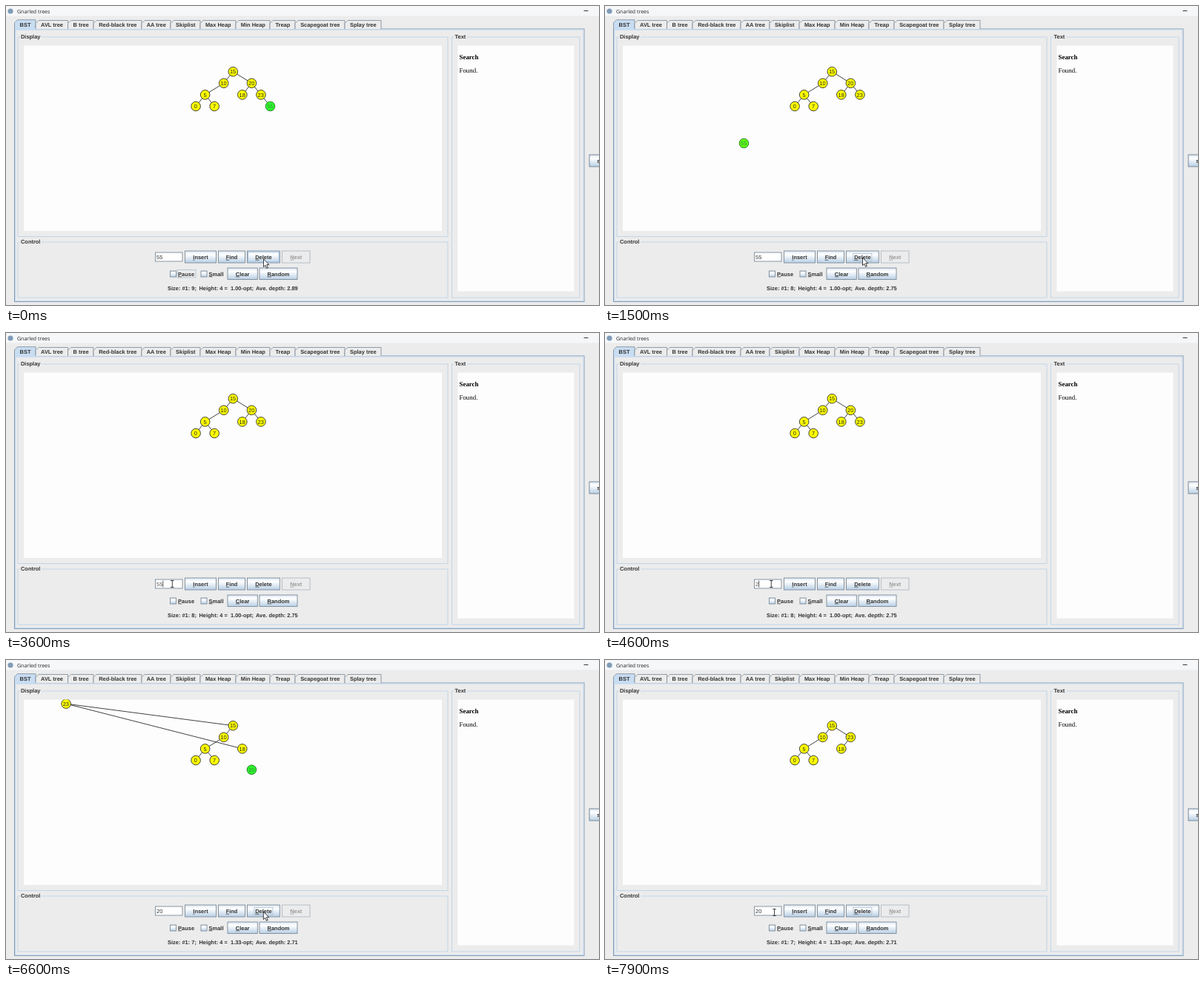
These frames come from a looping animation (800x404 px, 8000 ms). An HTML page:

```html
<!DOCTYPE html>
<html lang="en">
<head>
<meta charset="utf-8">
<title>Gnarled trees</title>
<style>
  html, body { margin: 0; width: 100%; height: 100%; overflow: hidden; background: #ececec; }
  svg { display: block; width: 100%; height: 100%; }
  text { font: 7.45px "Liberation Sans", Arial, sans-serif; fill: #333; white-space: pre; text-rendering: geometricPrecision; }
  .serif { font: 8.9px "Liberation Serif", Times, serif; fill: #000; }
  .title { font: 7px "Open Sans", "Noto Sans", sans-serif; fill: #222; }
  .bold { font-weight: bold; }
  .mid { text-anchor: middle; }
  .u { text-decoration: underline; }
</style>
</head>
<body>
<svg id="stage" viewBox="0 0 800 404" preserveAspectRatio="none">
  <defs>
    <linearGradient id="metal" x1="0" y1="0" x2="0" y2="1">
      <stop offset="0" stop-color="#dde8f3"/>
      <stop offset=".3" stop-color="#fff"/>
      <stop offset="1" stop-color="#b8cfe5"/>
    </linearGradient>
    <clipPath id="canvasClip"><rect x="24" y="53.5" width="564" height="250.5"/></clipPath>
  </defs>
  <g id="frame"></g>
  <g id="tree" clip-path="url(#canvasClip)"></g>
  <g id="control"></g>
  <g id="pointer"></g>
</svg>
<script>
const LOOP = 8000, STEP = 100;
const DELETE_55 = 1200, DELETE_20 = 6400, FALL = 1000, FIELD_CLICK = 3400;
const layer = id => document.getElementById(id);

const attrs = o => Object.entries(o).map(([k, v]) => ` ${k}="${v}"`).join('');
const rect = (x, y, x2, y2, fill = 'none', stroke = 'none', extra = {}) =>
  `<rect${attrs({ x, y, width: x2 - x, height: y2 - y, fill, stroke, ...extra })}/>`;
const label = (x, y, s, cls = 'bold', extra = {}) => `<text${attrs({ x, y, class: cls, ...extra })}>${s}</text>`;
const path = (d, stroke, fill = 'none', width = 1) =>
  `<path${attrs({ d, stroke, fill, 'stroke-width': width })}/>`;
const mnemonic = s => `<tspan class="u">${s[0]}</tspan>${s.slice(1)}`;

const tabs = [['BST', 40], ['AVL tree', 83.5], ['B tree', 118], ['Red-black tree', 183], ['AA tree', 222],
  ['Skiplist', 262], ['Max Heap', 310], ['Min Heap', 356], ['Treap', 390], ['Scapegoat tree', 457], ['Splay tree', 506]];

function button(x, x2, y, y2, name, { disabled, hover, focus } = {}) {
  const mid = (x + x2) / 2, base = (y + y2) / 2 + 2.8;
  let s = rect(x, y, x2, y2, disabled ? '#ececec' : 'url(#metal)', disabled ? '#b0b8c0' : '#7a8a99', { 'stroke-width': .9 });
  if (hover) s += rect(x + 1, y + 1, x2 - 1, y2 - 1, 'none', '#a3bfdc', { 'stroke-width': 1.2 });
  if (focus) s += rect(mid - 12.5, base - 7.5, mid + 12.5, base + 2.5, 'none', '#a3b8cc', { 'stroke-width': .7 });
  return s + label(mid, base, mnemonic(name), 'bold mid', disabled ? { style: 'fill:#999' } : {});
}

function checkbox(x, name, focus) {
  return rect(x, 358, x + 8, 366, 'url(#metal)', '#7a8a99', { 'stroke-width': .9 }) +
    label(x + 10.6, 364.5, mnemonic(name)) +
    (focus ? rect(x + 9.5, 356.5, x + 34.5, 367, 'none', '#a3b8cc', { 'stroke-width': .7 }) : '');
}

function group(x, y, x2, y2, title, titleWidth) {
  return rect(x, y, x2, y2, 'none', '#b8cfe5', { 'stroke-width': .8 }) +
    rect(x + 3, y - 3, x + 5 + titleWidth, y + 3, '#ececec') + label(x + 4, y + 2.3, title);
}

function drawFrame() {
  let s = rect(0, 0, 800, 404, '#ececec') + rect(0, 0, 800, 13.5, '#f6f7f9') +
    '<circle cx="6" cy="7" r="3.6" fill="#7f9bb8"/>' + label(15, 9.8, 'Gnarled trees', 'title') +
    path('M779.5 6.5h6', '#222', 'none', .9);
  s += rect(11.5, 31, 780, 399.5, 'none', '#7f96ae') +
    rect(12.7, 32, 779, 398.5, 'none', '#c8ddf2', { 'stroke-width': 1.2 });
  let x = 11.5;
  tabs.forEach(([name, end], i) => {
    const top = i ? 19.5 : 18.7;
    s += path(`M${x} 31V${top + 4}L${x + 4} ${top}H${end}V31`, '#7a8a99', i ? '#ececec' : '#c8ddf2', .8);
    s += label((x + end) / 2 + .3, 27.5, name, 'bold mid');
    x = end;
  });
  s += rect(12, 30, 39.6, 32.5, '#c8ddf2');
  s += group(16, 42, 596, 311.5, 'Display', 27) + rect(24, 53.5, 588, 304, '#fdfdfd');
  s += group(16, 319, 596, 394, 'Control', 27);
  s += group(601.5, 42, 774, 394, 'Text', 16) + rect(609.5, 53.5, 766.5, 385.5, '#fdfdfd');
  s += label(611.5, 71.5, 'Search', 'serif bold') + label(611.5, 89.6, 'Found.', 'serif');
  s += rect(787, 201, 810, 217, 'url(#metal)', '#7a8a99') + label(797.3, 211.8, 's');
  layer('frame').innerHTML = s;
}

const slot = (column, depth) => [306.3 + column * 12.55, 88.7 + depth * 15.6];
const mix = (a, b, p) => a.map((v, i) => v + (b[i] - v) * p);

function drawTree(t) {
  const at = { 15: slot(0, 0), 10: slot(-1, 1), 20: slot(2, 1), 5: slot(-3, 2), 18: slot(1, 2),
    23: slot(3, 2), 0: slot(-4, 3), 7: slot(-2, 3), 55: slot(4, 3) };
  const edges = [[15, 10], [10, 5], [5, 0], [5, 7]];
  const gone = new Set(), green = {};
  const fall55 = (t - DELETE_55) / FALL, fall20 = (t - DELETE_20) / FALL;

  if (fall55 < 0) edges.push([23, 55]);
  else at[55] = mix(at[55], [-207, 302], fall55);
  green[55] = fall55 < 0 ? '#2bff2b' : '#5cff14';
  if (fall55 >= 1) gone.add('55');

  if (fall20 < 0) edges.push([15, 20], [20, 18], [20, 23]);
  else {
    edges.push([15, 23], [23, 18]);
    at[23] = mix([18.5, 47.8], at[20], Math.min(1, fall20));
    at[20] = mix(at[20], [331.4, 324], fall20);
    green[20] = '#2bf52b';
    if (fall20 >= 1) gone.add('20');
  }

  const node = key => {
    const [x, y] = at[key];
    const [fill, stroke, ink] = green[key] ? [green[key], '#1c6a1c', '#3f7f3f'] : ['#ff0', '#222', '#222'];
    return `<circle cx="${x}" cy="${y}" r="6.3" fill="${fill}" stroke="${stroke}" stroke-width=".85"/>` +
      label(x - .2, y + 2.7, key, 'mid', { style: `fill:${ink}` });
  };
  const keys = Object.keys(at).filter(k => !gone.has(k)).sort((a, b) => !!green[a] - !!green[b]);
  layer('tree').innerHTML =
    edges.map(([a, b]) => path(`M${at[a]}L${at[b]}`, '#222', 'none', .85)).join('') + keys.map(node).join('');
}

const typing = [[0, '55'], [4000, '5'], [4200, ''], [4400, '2'], [4700, '20']];

function drawControl(t) {
  const editing = t >= FIELD_CLICK && t < DELETE_20;
  const deleteFocus = t >= DELETE_55 && !editing;
  const [since, value] = typing.filter(k => k[0] <= t).pop();
  const caretOn = (t - Math.max(since, FIELD_CLICK)) % 1000 < 500;
  const [size, height, depth] = t < DELETE_55 ? [9, '1.00', '2.89'] : t < DELETE_20 ? [8, '1.00', '2.75'] : [7, '1.33', '2.71'];

  let s = rect(201.5, 333, 238, 345, '#fff', '#7a8a99', { 'stroke-width': .9 }) +
    label(203, 341.8, value, '', { style: `fill:${editing ? '#555' : '#333'}` });
  if (editing && caretOn) s += path(`M${203.5 + value.length * 4.17} 334.5v9`, '#333', 'none', .8);
  s += button(241.5, 283.5, 331, 347, 'Insert') + button(286.5, 322.5, 331, 347, 'Find') +
    button(325.5, 369.3, 331, 347, 'Delete', { hover: t < DELETE_55, focus: deleteFocus }) +
    button(372.5, 410, 331, 347, 'Next', { disabled: true });
  s += checkbox(221.5, 'Pause', t < DELETE_55) + checkbox(263, 'Small') +
    button(299, 339.3, 354, 369.5, 'Clear') + button(342, 393, 354, 369.5, 'Random');
  s += label(218, 383.8, `Size: #1: ${size};`) + label(260.5, 383.8, 'Height: 4 =') +
    label(303, 383.8, `${height}-opt;`) + label(337, 383.8, `Ave. depth: ${depth}`);
  layer('control').innerHTML = s;
}

const pointerKeys = [[0, 347.5, 342], [1000, 347.5, 342], [1200, 347.5, 340], [2500, 347.5, 340], [3200, 224.3, 339],
  [5750, 224.3, 339], [6250, 347.3, 340], [7000, 347.3, 340], [7600, 228.5, 341], [LOOP, 228.5, 341]];

function drawPointer(t) {
  const i = pointerKeys.findIndex(k => k[0] > t);
  const [t0, ...from] = pointerKeys[i - 1], [t1, ...to] = pointerKeys[i];
  const p = (t - t0) / (t1 - t0);
  const [x, y] = mix(from, to, p * p * (3 - 2 * p));
  const overField = x > 201 && x < 238;
  layer('pointer').innerHTML = overField
    ? path(`M${x - 2.2} ${y - 4.5}h4.4m-2.2 0v9m-2.2 0h4.4`, '#111', 'none', .8)
    : path(`M${x} ${y}v10.5l2.4-2.2 1.7 4 1.8-.8-1.7-3.9h3.2z`, '#111', '#fff', .8);
}

function render(now) {
  const t = Math.floor((now % LOOP) / STEP) * STEP;
  drawTree(t);
  drawControl(t);
  drawPointer(t);
}

drawFrame();
render(0);
const start = performance.now();
(function tick() {
  render(performance.now() - start);
  requestAnimationFrame(tick);
})();
</script>
</body>
</html>
```
